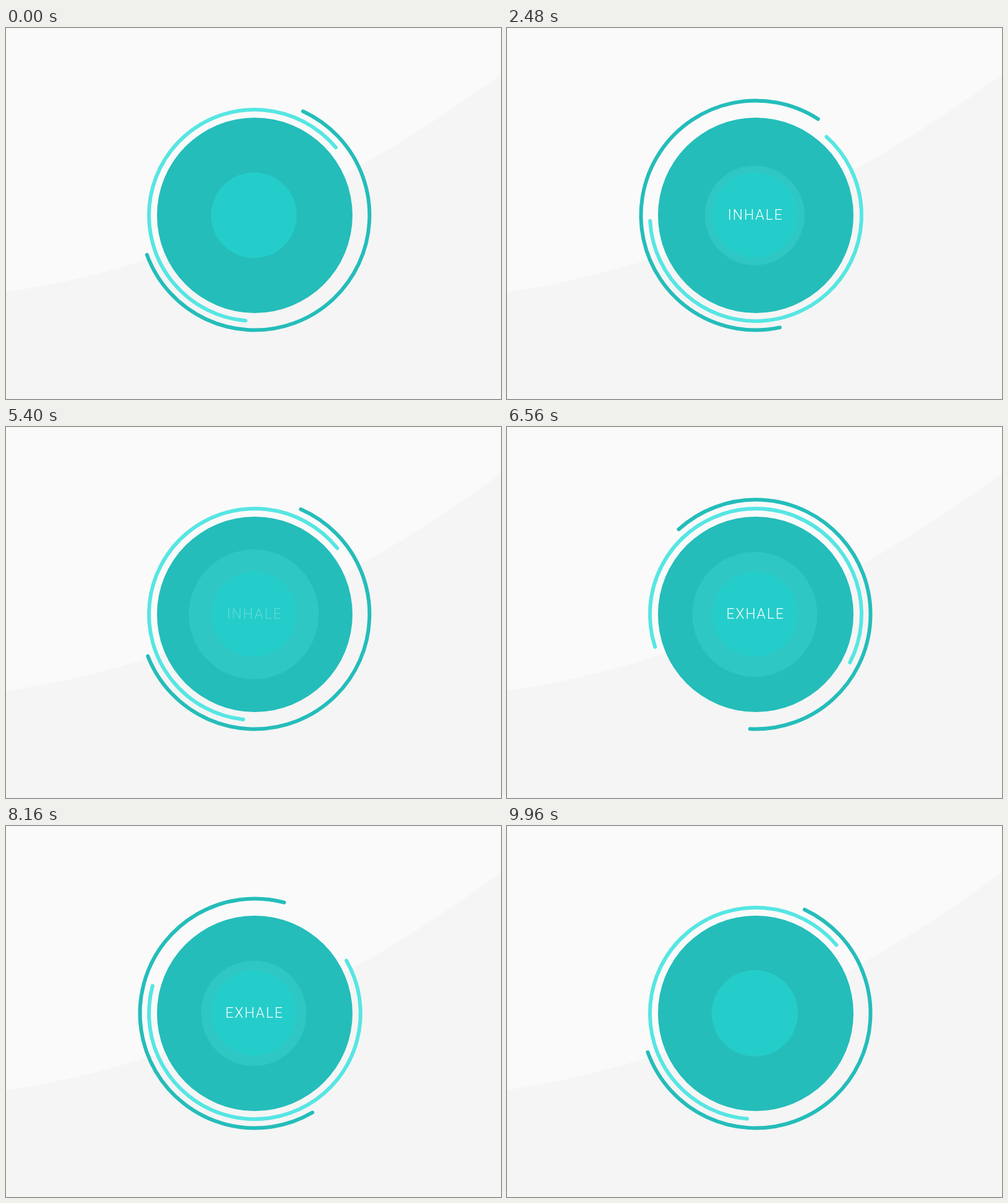
An HTML page with a canvas that plays this animation: 800x600 px, repeating every 10000 ms.

```html
<!DOCTYPE html>
<html lang="en">
<head>
<meta charset="utf-8">
<title>Breathe</title>
<style>
  html, body { margin: 0; width: 100%; height: 100%; overflow: hidden; background: #fafafa; }
  canvas { display: block; width: 800px; height: 600px; }
</style>
</head>
<body>
<canvas id="stage" width="800" height="600"></canvas>
<script>
const ctx = document.getElementById('stage').getContext('2d');
const LOOP = 10000;
const FPS = 24;
const TEAL = '#24bdba';
const SWEEP = 225;

const clamp = v => Math.min(1, Math.max(0, v));
const ramp = (k, from, to) => clamp((k - from) / (to - from));
const ease = u => u * u * (3 - 2 * u);
const rad = deg => deg * Math.PI / 180;

// Rises from frame `a` and falls from frame `b`, each over 116 frames
const breath = (k, a, b) => ease(ramp(k, a, a + 116)) - ease(ramp(k, b, b + 116));

function disc(x, y, r, color) {
  ctx.fillStyle = color;
  ctx.beginPath();
  ctx.arc(x, y, r, 0, Math.PI * 2);
  ctx.fill();
}

function ring(r, start, color) {
  ctx.strokeStyle = color;
  ctx.lineWidth = 6;
  ctx.lineCap = 'round';
  ctx.beginPath();
  ctx.arc(402, 303, r, rad(start), rad(start + SWEEP));
  ctx.stroke();
}

function background() {
  ctx.fillStyle = '#fafafa';
  ctx.fillRect(0, 0, 800, 600);
  ctx.fillStyle = '#f5f5f5';
  ctx.beginPath();
  ctx.moveTo(0, 427);
  ctx.quadraticCurveTo(400, 369, 800, 75);
  ctx.lineTo(800, 600);
  ctx.lineTo(0, 600);
  ctx.fill();
}

// `alphaOf` gives the opacity of the letter at an index
function word(text, alphaOf) {
  ctx.font = '300 23px Roboto, sans-serif';
  ctx.letterSpacing = '1.9px';
  ctx.fillStyle = '#fff';
  const left = 400.8 - (ctx.measureText(text).width - 1.9) / 2;
  [...text].forEach((letter, i) => {
    ctx.globalAlpha = alphaOf(i);
    ctx.fillText(letter, left + ctx.measureText(text.slice(0, i)).width, 310.3);
  });
  ctx.globalAlpha = 1;
}

// Letters switch one after another in a scattered order
const IN_ORDER = [3, 1, 4, 0, 5, 2];
const OUT_ORDER = [0, 2, 3, 1, 4, 5];
const scattered = (k, start, rank) => ramp(k, start + rank * 4, start + rank * 4 + 4);

function draw(k) {
  const turn = 360 * breath(k, 9, 125);
  background();
  ring(185.5, -65.1 + turn, TEAL);
  ring(171, 95 - turn, '#56e6e3');
  disc(402, 303, 158, TEAL);
  disc(400.4, 303, 69 + 36 * breath(k, 15, 133), '#2ec7c4');
  disc(400.8, 302.6, 69, '#24cdca');

  if (k < 133) {
    const fade = 1 - ramp(k, 121, 132);
    word('INHALE', i => fade * scattered(k, 13, IN_ORDER[i]));
  } else {
    const fade = ramp(k, 133, 145);
    word('EXHALE', i => fade * (1 - scattered(k, 198, OUT_ORDER[i])));
  }
}

function tick(now) {
  draw(Math.floor((now % LOOP) * FPS / 1000));
  requestAnimationFrame(tick);
}

draw(0);
requestAnimationFrame(tick);
</script>
</body>
</html>
```
